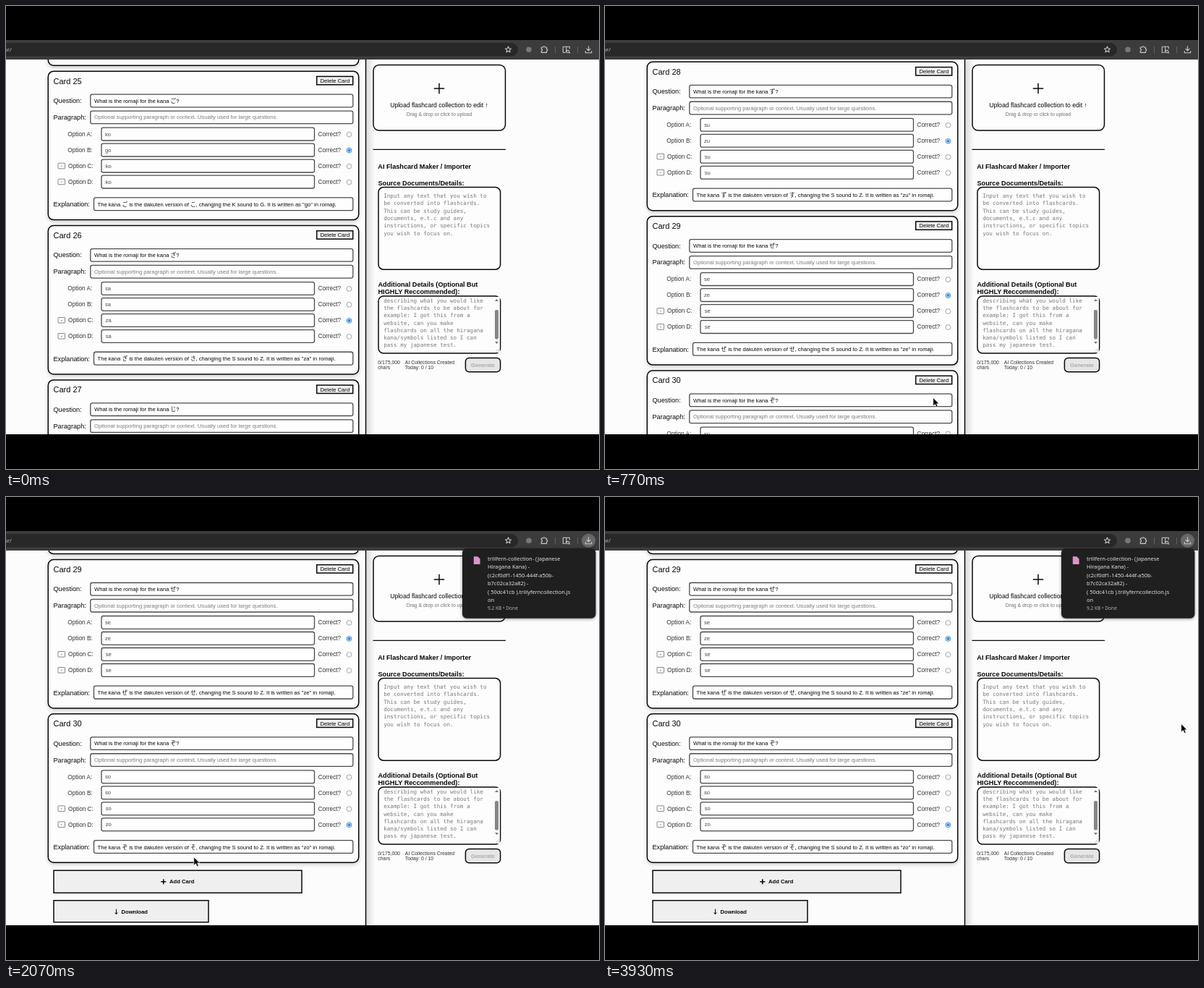
Write an HTML page that moves like this. It is 820x640 px and loops after 4.27 s.

```html
<!DOCTYPE html>
<html lang="en">
<head>
<meta charset="utf-8">
<title>Flashcard editor</title>
<style>
html, body { margin: 0; width: 100%; height: 100%; overflow: hidden; background: #000; }
svg { display: block; width: 820px; height: 640px; }
text { font-family: "Liberation Sans", "Noto Sans CJK JP", "Noto Sans CJK", sans-serif; font-size: 7.64px; fill: #080808; white-space: pre; }
.title { font-size: 11px; }
.label { font-size: 9.17px; }
.opt { font-size: 8.25px; fill: #333; }
.val { fill: #484848; }
.hint { fill: #7c7c7c; }
.mono { font-family: "DejaVu Sans Mono", monospace; fill: #7a7a7a; }
.bold { font-weight: bold; }
.head { font-weight: bold; font-size: 9.17px; }
.small { font-size: 6.88px; fill: #333; }
.ui { font-family: "Noto Sans", sans-serif; font-size: 7.45px; font-weight: 500; fill: #e3e3e3; }
.mid { text-anchor: middle; }
.card { fill: #fdfdfd; stroke: #080808; stroke-width: 1.5; filter: drop-shadow(0 2px 2.5px rgba(0, 0, 0, .2)); }
.box { fill: #fdfdfd; stroke: #080808; stroke-width: 1.5; }
.field { fill: #fefefe; stroke: #4c4c4c; stroke-width: 1.3; }
.btn { fill: #efefef; stroke: #080808; stroke-width: 1.5; }
.tiny { fill: #fdfdfd; stroke: #6c6c6c; stroke-width: .8; }
.line { fill: none; stroke: #080808; stroke-width: 1.5; }
.icon { fill: none; stroke: #c7c7c7; stroke-width: 1.1; stroke-linejoin: round; }
.radio { fill: #fefefe; stroke: #8e8e8e; stroke-width: .8; }
.on { stroke: #3a86d4; stroke-width: 1; }
</style>
</head>
<body>
<svg viewBox="0 0 820 640">
  <defs>
    <clipPath id="page"><rect y="74" width="820" height="518"/></clipPath>
    <clipPath id="notes"><rect x="516" y="402" width="159" height="77"/></clipPath>
    <linearGradient id="edge">
      <stop offset="0" stop-opacity=".14"/>
      <stop offset="1" stop-opacity="0"/>
    </linearGradient>
  </defs>
  <rect width="820" height="640"/>
  <rect y="74" width="820" height="518" fill="#fcfcfc"/>
  <g clip-path="url(#page)">
    <g id="deck"></g>
    <g id="side"></g>
  </g>
  <g id="bar"></g>
  <g id="popup"></g>
  <path id="cursor" d="M0 0V11.2L2.7 8.9 4.5 12.8 6.4 12 4.7 8.2H8Z" fill="#000" stroke="#fff" stroke-width=".6"/>
</svg>
<script>
const $ = id => document.getElementById(id);
const text = (x, y, s, cls = '', style = '') => `<text x="${x}" y="${y}" class="${cls}" style="${style}">${s}</text>`;
const rect = (x, y, w, h, r, cls, more = '') =>
  `<rect x="${x}" y="${y}" width="${w}" height="${h}" rx="${r}" class="${cls}" ${more}/>`;
const path = (d, cls = 'line', more = '') => `<path d="${d}" class="${cls}" ${more}/>`;
const lines = (x, y, step, cls, rows) => rows.map((s, i) => text(x, y + i * step, s, cls)).join('');

// kana, plain kana, wrong reading, right reading, right option, sounds
const cards = [
  ['げ', 'け', 'ke', 'ge', 1, 'K', 'G'],
  ['ご', 'こ', 'ko', 'go', 1, 'K', 'G'],
  ['ざ', 'さ', 'sa', 'za', 2, 'S', 'Z'],
  ['じ', 'し', 'shi', 'ji', 3, 'S', 'J'],
  ['ず', 'す', 'su', 'zu', 1, 'S', 'Z'],
  ['ぜ', 'せ', 'se', 'ze', 1, 'S', 'Z'],
  ['ぞ', 'そ', 'so', 'zo', 3, 'S', 'Z']
];
const PITCH = 213.35, TOP = 90.2 - PITCH;

function option(i, value, right) {
  const y = 87 + i * 22, extra = i > 1;
  let out = text(extra ? 86 : 85.3, y + 2.7, `Option ${'ABCD'[i]}:`, 'opt')
    + rect(132, y - 9, 294.5, 17.8, 2.5, 'field')
    + text(extra ? 137.8 : 137, y + 2.6, value, 'val')
    + text(431.5, y + 2.7, 'Correct?', 'opt')
    + `<circle cx="474.5" cy="${y + .4}" r="3.4" class="radio ${right ? 'on' : ''}"/>`;
  if (right) out += `<circle cx="474.5" cy="${y + .4}" r="2.1" fill="#3a86d4"/>`;
  if (extra) out += rect(72, y - 4, 9.5, 7.6, .5, 'tiny') + path(`M75.9 ${y}h1.8`, 'tiny');
  return out;
}

function card([kana, base, wrong, right, answer, from, to], i) {
  return `<g transform="translate(0 ${TOP + i * PITCH})">`
    + rect(58.3, 0, 429.4, 205.4, 7.5, 'card')
    + text(65.5, 17.4, `Card ${24 + i}`, 'title')
    + rect(429.7, 7.2, 50, 11.4, 0, 'btn') + text(454.8, 15.7, 'Delete Card', 'mid')
    + text(65.5, 43.9, 'Question:', 'label')
    + rect(116.8, 32, 363, 17.6, 2.5, 'field')
    + text(122, 43.5, `What is the romaji for the kana ${kana}?`)
    + text(65.5, 66.8, 'Paragraph:', 'label')
    + rect(116.8, 54.9, 363, 17.6, 2.5, 'field')
    + text(122, 66.2, 'Optional supporting paragraph or context. Usually used for large questions.', 'hint')
    + [0, 1, 2, 3].map(n => option(n, n === answer ? right : wrong, n === answer)).join('')
    + text(65.5, 187.1, 'Explanation:', 'label')
    + rect(121.5, 174.7, 358.3, 17.8, 2.5, 'field')
    + text(126.5, 186.7, `The kana ${kana} is the dakuten version of ${base}, changing the ${from} sound to ${to}. It is written as "${right}" in romaji.`)
    + '</g>';
}

function deck() {
  const y = TOP + 7 * PITCH;
  return cards.map(card).join('')
    + rect(66, y + 3, 343, 31, 0, 'btn')
    + path(`M214.3 ${y + 18.5}h7M217.8 ${y + 15}v7`)
    + text(226, y + 21.2, 'Add Card', 'bold')
    + rect(66, y + 44.5, 214, 30, 0, 'btn')
    + path(`M152.5 ${y + 56.3}v7M150.6 ${y + 61.2}l1.9 2.3 1.9 -2.3`, 'line', 'style="stroke-width:1"')
    + text(159.5, y + 62.5, 'Download', 'bold');
}

function side() {
  return rect(498, 74, 12, 518, 0, '', 'fill="url(#edge)"')
    + path('M497.5 74V592')
    + rect(508, 81.5, 182.5, 90.5, 8, 'box')
    + path('M591.8 114h14.4M599 106.8v14.4')
    + text(599, 140.4, 'Upload flashcard collection to edit ↑', 'mid', 'font-size:8.65px')
    + text(599, 152, 'Drag &amp; drop or click to upload', 'small mid', 'fill:#707070')
    + path('M507.5 198.4H691', 'line', 'style="stroke-width:1.3"')
    + text(514.3, 225.4, 'AI Flashcard Maker / Importer', 'head')
    + text(514.5, 247.6, 'Source Documents/Details:', 'head')
    + rect(515, 250.6, 168.6, 113.6, 7, 'box')
    + lines(522.2, 265, 10.3, 'mono', [
      'Input any text that you wish to', 'be converted into flashcards.',
      'This can be study guides,', 'documents, e.t.c and any',
      'instructions, or specific topics', 'you wish to focus on.'])
    + text(514.5, 387.5, 'Additional Details (Optional But', 'head')
    + text(514.5, 398, 'HIGHLY Reccommended):', 'head')
    + rect(515, 401, 168.6, 79, 7, 'box')
    + '<g clip-path="url(#notes)">'
    + lines(522.2, 409.6, 10.3, 'mono', [
      'describing what you would like', 'the flashcards to be about for',
      'example: I got this from a', 'website, can you make',
      'flashcards on all the hiragana', 'kana/symbols listed so I can',
      'pass my japanese test.'])
    + '</g>'
    + rect(675, 402, 7.8, 77, 0, '', 'fill="#fcfcfc"')
    + rect(676, 420, 5, 40.5, 2, '', 'fill="#868686"')
    + path('M676 408l2.5-3 2.5 3zM676 464l2.5 3 2.5-3z', '', 'fill="#757575"')
    + path('M677 478l5-5M680 478l2-2', 'line', 'style="stroke:#aaa;stroke-width:.7"')
    + lines(514.3, 494.6, 7.8, 'small', ['0/175,000', 'chars'])
    + lines(551.8, 494.6, 7.8, 'small', ['AI Collections Created', 'Today: 0 / 10'])
    + rect(635.4, 486.6, 48.2, 19.2, 5, 'btn', 'style="fill:#e6e6e6"')
    + text(659.5, 499.1, 'Generate', 'bold mid', 'fill:#aaa');
}

function star(cx, cy) {
  const pts = [...Array(10).keys()].map(i => {
    const a = (i / 5 - .5) * Math.PI, r = i % 2 ? 1.9 : 4.4;
    return `${(cx + r * Math.cos(a)).toFixed(2)} ${(cy + r * Math.sin(a)).toFixed(2)}`;
  });
  return path(`M${pts.join('L')}Z`, 'icon');
}

function bar() {
  return rect(0, 47, 820, 27, 0, '', 'fill="#3c3c3c"')
    + rect(-20, 51, 728, 18.5, 9.2, '', 'fill="#282828"')
    + text(-2.6, 62.8, 'or/', 'ui', 'font-weight:400;fill:#c7c7c7')
    + star(694.5, 60.3)
    + '<circle cx="723" cy="60.3" r="3.8" fill="#777"/>'
    + path('M740.3 57h2.4a1.3 1.3 0 0 1 2.6 0h2.2v2.4a1.3 1.3 0 0 1 0 2.6v2.4h-7.2v-2.4a1.3 1.3 0 0 0 0-2.6z', 'icon')
    + path('M759.5 56v9M790.5 56v9', 'icon', 'style="stroke:#6c6c6c;stroke-width:.8"')
    + path('M770.3 56.3h9v3M774 64.3h-3.7v-8M774.8 56.3v8M777 61.2a1.8 1.8 0 1 0 .1 0M778.4 64l1.6 1.4', 'icon')
    + '<circle id="halo" cx="805.5" cy="60.3" r="9.6" fill="#686868"/>'
    + path('M805.5 55.3v6.2M802.8 59l2.7 2.8 2.7-2.8M801.3 62v2.7h8.4V62', 'icon');
}

function popup() {
  return rect(631, 71, 184.5, 96.8, 6, '', 'fill="#1f1f20" style="filter:drop-shadow(0 1px 2px rgba(0,0,0,.4))"')
    + path('M646.8 82.2h5.4l3.4 3.2v7.6h-8.8z', '', 'fill="#dc94c8"')
    + lines(666, 88, 11.46, 'ui', [
      'trillfern-collection- (Japanese', 'Hiragana Kana) -',
      '(c2cf0df1-1450-444f-a50b-', 'b7c02ca32a82) -',
      '( 50dc41cb ).trillyferncollection.js', 'on'])
    + text(666, 156, '9.2 KB • Done', 'ui', 'font-size:6.6px;font-weight:400;fill:#b0b0b0');
}

$('deck').innerHTML = deck();
$('side').innerHTML = side();
$('bar').innerHTML = bar();
$('popup').innerHTML = popup();

const LOOP = 4270, TICK = 1000 / 30, SCROLL = 857.1;
const stops = [
  [2, 384, 396], [3, 438, 554], [11, 438, 554], [16, 453.8, 541.6], [30, 453.8, 541.6],
  [41, 252, 589], [46, 240, 575], [50, 248, 498], [59, 248, 498],
  [68, 293.6, 497.4], [73, 293.6, 497.4], [91, 643.5, 158.2],
  [98, 656, 146], [103, 656, 146], [118, 796.8, 313.6]
];

function pointer(n) {
  const i = stops.findIndex(s => s[0] > n);
  if (i < 1) return stops.at(i).slice(1);
  const [t0, x0, y0] = stops[i - 1], [t1, x1, y1] = stops[i];
  const p = (n - t0) / (t1 - t0), e = p * p * (3 - 2 * p);
  return [x0 + (x1 - x0) * e, y0 + (y1 - y0) * e];
}
const scroll = n => n < 11 ? 0 : SCROLL / (1 + Math.exp(-.653 * (n - 21.22)));
const show = (id, on) => $(id).style.display = on ? '' : 'none';

function draw() {
  const n = Math.floor((performance.now() % LOOP + 4) / TICK);
  $('deck').setAttribute('transform', `translate(0 ${-scroll(n)})`);
  $('cursor').setAttribute('transform', `translate(${pointer(n)})`);
  show('cursor', n >= 2 && (n < 42 || n >= 46));
  show('popup', n >= 60);
  show('halo', n >= 60);
  requestAnimationFrame(draw);
}
draw();
</script>
</body>
</html>
```
